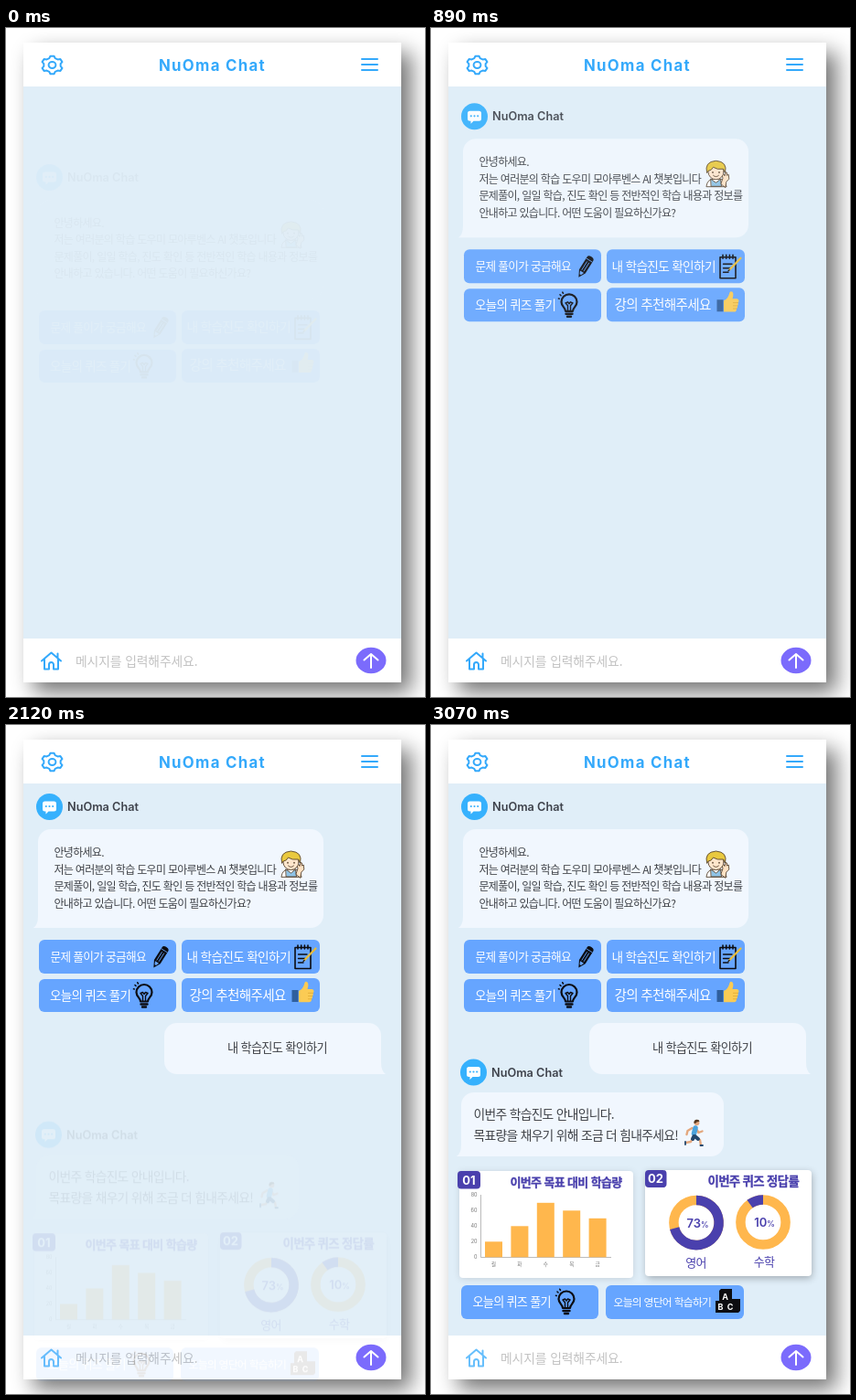
An HTML page for the animation above (3.73 s loop, 458 by 732 pixels).

```html
<!DOCTYPE html>
<html lang="ko">
<head>
<meta charset="utf-8">
<title>Chat</title>
<style>
html, body { margin: 0; width: 100%; height: 100%; overflow: hidden; background: #fff; }
svg { display: block; width: 100vw; height: 100vh; }
text { font-family: "Noto Sans CJK KR", "Noto Sans CJK JP", "Noto Sans CJK", sans-serif; letter-spacing: -.7px; }
.latin { font-family: Inter, "Open Sans", sans-serif; letter-spacing: 0; }
.name { font-size: 12.7px; font-weight: 600; fill: #3e424b; }
.line { fill: none; stroke-linecap: round; stroke-linejoin: round; }
.bubble { fill: #f1f7fe; }
.button { fill: #66a5ff; }
.label { fill: #fff; font-weight: 300; }
.talk { fill: #3f4247; }
.mid { text-anchor: middle; }
.tiny { font-size: 5.5px; fill: #777; letter-spacing: 0; }
.head { font-size: 13px; font-weight: 900; fill: #4a40ad; stroke: #4a40ad; stroke-width: .3; letter-spacing: -.65px; }
.ring { fill: none; stroke-width: 10.5; }
</style>
</head>
<body>
<svg viewBox="0 0 458 732" preserveAspectRatio="none">
  <defs>
    <filter id="blur" x="-20%" y="-20%" width="140%" height="140%"><feGaussianBlur stdDeviation="11.500"/></filter>
    <filter id="soft" x="-20%" y="-20%" width="140%" height="140%"><feGaussianBlur stdDeviation="4"/></filter>
    <g id="avatar">
      <circle r="14.500" fill="#36b1fd"/>
      <path d="M-5-6H5q2.500 0 2.500 2.500V2.500Q7.500 5 5 5H-1L-4 8V5H-5Q-7.500 5-7.500 2.500V-3.500Q-7.500-6-5-6Z" fill="#fff"/>
      <g fill="#36b1fd"><circle cx="-3.700" cy="-.5" r="1.100"/><circle cy="-.5" r="1.100"/><circle cx="3.700" cy="-.5" r="1.100"/></g>
    </g>
    <g id="bulb" class="line" stroke="#0c0c10" stroke-width="2.200">
      <path d="M-4 8C-4 4-8.500 3-8.500-2A8.500 8.500 0 0 1 8.500-2C8.500 3 4 4 4 8Z"/>
      <path d="M-1.500 7V2L-4-1L-1.500-2L0 0L1.500-2L4-1L1.500 2V7" stroke-width="1.400"/>
      <path d="M-3.500 11H3.500M-2 14H2" stroke-width="2.400"/>
      <path d="M-9-9l-1-1M-6.500-11.500l-.7-1.200M-10.800-5.500l-.7-.2" stroke-width="1.600"/>
    </g>
  </defs>

  <rect x="30" y="27" width="413" height="700" opacity=".55" filter="url(#blur)"/>
  <rect x="19" y="16" width="413" height="700" fill="#fff"/>
  <rect x="19" y="64" width="413" height="604" fill="#e0eef8"/>
  <g class="line" stroke="#34a9fb" stroke-width="2">
    <path id="gear"/>
    <ellipse cx="50.500" cy="40.500" rx="3.900" ry="3.400"/>
    <path d="M389 34H406M389 40H406M389 46H406"/>
    <path id="home" d="M39 692.500L49.500 683.500L60 692.500M42 690.500V701.500H47V696.500a2.500 2.500 0 0 1 5 0V701.500H57V690.500M56.500 684.500V688.500"/>
  </g>
  <text class="latin mid" x="225.500" y="46.500" font-size="16.800" font-weight="700" fill="#34a9fb" style="letter-spacing:1.300px">NuOma Chat</text>
  <text x="76" y="697.500" font-size="13.800" font-weight="300" fill="#c2c2c2" style="letter-spacing:-.1px">메시지를 입력해주세요.</text>
  <ellipse cx="399" cy="692" rx="16.500" ry="14.300" fill="#7b6bfc"/>
  <path class="line" stroke="#fff" stroke-width="2" d="M399 700V685M391.500 691.500L399 685L406.500 691.500"/>

  <g class="part">
    <use href="#avatar" x="47.500" y="89.500"/>
    <text class="latin name" x="67" y="94">NuOma Chat</text>
    <path class="bubble" d="M49 114H333a14 14 0 0 1 14 14V208a14 14 0 0 1-14 14H30q5-3 5-13V128a14 14 0 0 1 14-14Z"/>
    <g class="talk" font-size="12">
      <text x="52.500" y="144">안녕하세요.</text>
      <text x="52.500" y="162.500">저는 여러분의 학습 도우미 모아루벤스 AI 챗봇입니다</text>
      <text x="52.500" y="181">문제풀이, 일일 학습, 진도 확인 등 전반적인 학습 내용과 정보를</text>
      <text x="52.500" y="199.500">안내하고 있습니다. 어떤 도움이 필요하신가요?</text>
    </g>
    <!-- waving boy -->
    <g class="line" stroke="#5a4630" stroke-width=".9">
      <path d="M301 166q1-8 8-8h7q5 0 7 8z" fill="#fff"/>
      <path d="M306 158l5.500 4 5-4 1 8h-11z" fill="#8fc3e6"/>
      <path d="M317 163l2-6-1-4 2-.5 1 2 1-4 1.500.5v3l1.800-1 .5 5-3 3-1 6z" fill="#ffe2c4"/>
      <circle cx="311.500" cy="150" r="8.500" fill="#ffe6cc"/>
      <path d="M301.500 151q-3-12 10-13 13 1 10 13l-2-4q-7 1-11-2-2 4-5 4z" fill="#e9c93f"/>
      <path d="M308.500 154q3 3 6 0"/>
      <path d="M308 150.500v.5M315 150.500v.5" stroke-width="1.600"/>
    </g>
    <g class="button">
      <rect x="36" y="235" width="150" height="37" rx="6"/>
      <rect x="192" y="235" width="151" height="37" rx="6"/>
      <rect x="36" y="278" width="150" height="36" rx="6"/>
      <rect x="192" y="277" width="151" height="37" rx="6"/>
    </g>
    <g class="label">
      <text x="48.500" y="258" font-size="12.700">문제 풀이가 궁금해요</text>
      <text x="197.500" y="258.500" font-size="13.700">내 학습진도 확인하기</text>
      <text x="48" y="301" font-size="13.500">오늘의 퀴즈 풀기</text>
      <text x="200.500" y="300.500" font-size="14.600">강의 추천해주세요</text>
    </g>
    <!-- pencil -->
    <g transform="translate(168.500 254) rotate(32)">
      <path d="M-4-10q0-3 4-3t4 3V6L0 13.500L-4 6Z" fill="#0c0c10"/>
      <path d="M-4-8.500H4M-1.300-6V5M1.300-6V5" stroke="#66a5ff" stroke-width=".8"/>
      <path d="M-2.400 6.500H2.400L.8 10H-.8Z" fill="#66a5ff"/>
    </g>
    <!-- notepad -->
    <g class="line" stroke="#0c0c10" stroke-width="1.600">
      <path d="M316 243.500H333V266.500H316ZM319 241v4M322.700 241v4M326.400 241v4M330 241v4"/>
      <path d="M319.500 251H329M319.500 255.500H327M319.500 260H325" stroke-width="1.400"/>
      <path d="M326 257.500L338.500 244.500" stroke="#e9bd3a" stroke-width="2.200"/>
      <path d="M325 258.500l1.200-1.200" stroke-width="1.200"/>
    </g>
    <use href="#bulb" x="151" y="294.500"/>
    <!-- thumb up -->
    <rect x="312.500" y="290" width="7" height="13" fill="#2f5f9e"/>
    <path d="M320 291q5-2 6.500-9 1-2 3-.5 1.800 2 0 7.500h5q2 .3 2 2.200 0 1.400-1 2 1 2-.5 3.400.5 2-1 3 .3 3.600-3 3.600H320Z" fill="#fbcb54"/>
    <path d="M330 293.300H336M330 296.600H335.300M330 299.800H334.500" stroke="#dda62f" stroke-width=".7"/>
  </g>

  <g class="part">
    <path class="bubble" d="M187 326H396a14 14 0 0 1 14 14V369q0 10 5 13H187a14 14 0 0 1-14-14V340a14 14 0 0 1 14-14Z"/>
    <text class="talk mid" x="296.500" y="358" font-size="13.200">내 학습진도 확인하기</text>
  </g>

  <g class="part">
    <use href="#avatar" x="46.500" y="380"/>
    <text class="latin name" x="66" y="385">NuOma Chat</text>
    <path class="bubble" d="M47 402H306a14 14 0 0 1 14 14V458a14 14 0 0 1-14 14H28q5-3 5-13V416a14 14 0 0 1 14-14Z"/>
    <g class="talk" font-size="13.800">
      <text x="46.500" y="431">이번주 학습진도 안내입니다.</text>
      <text x="46.500" y="453.500">목표량을 채우기 위해 조금 더 힘내주세요!</text>
    </g>
    <!-- runner -->
    <g class="line" stroke-width="2.400">
      <path stroke="#e3a77d" d="M285.500 441l-5 3-1 4M290 442l2.500 4 4-1.500M286 452l-2 4-5.500 1M290 452l4 2 1 6"/>
      <path stroke="#4ba3dc" stroke-width="5.500" d="M289 441L287.500 447"/>
      <path stroke="#23486e" stroke-width="4" d="M287.500 450L286 453M288.500 450L292 453"/>
      <path stroke="#23486e" stroke-width="1.800" d="M278 456v3M294.500 460h2.500"/>
    </g>
    <circle cx="290.500" cy="435.300" r="2.900" fill="#e3a77d"/>
    <path d="M287.300 435.500q0-4 3.600-3.800 2.500 0 2.600 2.300-3-.6-4.500 2z" fill="#54371f"/>

    <rect x="32" y="490" width="188" height="115" opacity=".15" filter="url(#soft)"/>
    <rect x="31" y="488" width="190" height="117" rx="4" fill="#fff"/>
    <rect x="236" y="490" width="180" height="115" opacity=".3" filter="url(#soft)"/>
    <rect x="234" y="487" width="182" height="116" rx="4" fill="#fff"/>
    <g fill="#4a40ad"><rect x="29" y="488" width="25" height="19.500" rx="4"/><rect x="234" y="487" width="23.500" height="19" rx="4"/></g>
    <g class="mid" font-size="13" font-weight="700" fill="#fff">
      <text class="latin" x="41.500" y="502.500">01</text>
      <text class="latin" x="245.500" y="501">02</text>
    </g>
    <text class="head" x="86.500" y="505">이번주 목표 대비 학습량</text>
    <text class="head" x="302.500" y="503.500" style="font-size:13.400px">이번주 퀴즈 정답률</text>
    <path d="M54.500 514V582.500H197" fill="none" stroke="#aaa" stroke-width=".8"/>
    <g id="chart"></g>

    <g class="ring">
      <circle cx="290" cy="544.500" r="24.600" stroke="#ffb74d"/>
      <circle cx="363" cy="544" r="24.600" stroke="#ffb74d"/>
      <path d="M290 519.900A24.600 24.600 0 1 1 266.200 550.600M348.500 524.100A24.600 24.600 0 0 1 363 519.400" stroke="#4a40ad"/>
    </g>
    <g class="mid" font-size="13" fill="#4a40ad">
      <g font-weight="600">
        <text class="latin" x="291.500" y="550">73<tspan font-size="8.500">%</tspan></text>
        <text class="latin" x="364.500" y="549">10<tspan font-size="8.500">%</tspan></text>
      </g>
      <text x="289.500" y="592.500" font-weight="500">영어</text>
      <text x="364" y="592" font-weight="500">수학</text>
    </g>

    <g class="button"><rect x="33" y="613" width="150" height="37" rx="6"/><rect x="191" y="613" width="151" height="37" rx="6"/></g>
    <g class="label">
      <text x="45.500" y="636" font-size="13.100">오늘의 퀴즈 풀기</text>
      <text x="199.500" y="636" font-size="11.800">오늘의 영단어 학습하기</text>
    </g>
    <use href="#bulb" x="148" y="630"/>
    <!-- letter blocks -->
    <path d="M315 619l2-2h12v11h9v13l-2 2H311V630h4Z" fill="#0c0c10"/>
    <g class="mid" font-size="9" font-weight="700" fill="#fff">
      <text class="latin" x="321.500" y="628.500">A</text>
      <text class="latin" x="316.500" y="640">B</text>
      <text class="latin" x="327" y="640">C</text>
    </g>
  </g>
</svg>
<script>
const byId = id => document.getElementById(id);

// six-toothed gear outline, slightly wider than tall
let outline = "";
for (let i = 0; i < 24; i++) {
  const r = i % 4 < 2 ? 10.8 : 8.6;
  const a = (Math.floor(i / 2) * 30 - 90 + (i % 2 ? 10 : -10)) * Math.PI / 180;
  outline += (i ? "L" : "M") + (50.5 + 1.08 * r * Math.cos(a)).toFixed(2) + " " + (40.5 + .92 * r * Math.sin(a)).toFixed(2);
}
byId("gear").setAttribute("d", outline + "Z");

// bar chart
const baseY = 582.3, unit = .85;
let marks = "";
for (let v = 0; v <= 80; v += 20)
  marks += `<text class="tiny latin" text-anchor="end" x="50.5" y="${baseY + 1.5 - v * unit}">${v}</text>`;
[20, 40, 70, 60, 50].forEach((v, i) => {
  const x = 59 + i * 28.4;
  marks += `<rect x="${x}" y="${baseY - v * unit}" width="19" height="${v * unit}" fill="#ffb74d"/>
    <text class="tiny mid" x="${x + 9.5}" y="592">${"월화수목금"[i]}</text>`;
});
byId("chart").innerHTML = marks;

const loop = 3730, step = 68.3, rise = 75, fade = 1000;
const starts = [-15, 1000, 2027];
const parts = document.querySelectorAll(".part");
const origin = performance.now();

function draw(now) {
  const time = Math.max(0, now - origin) % loop;
  const t = Math.floor((time + 5) / step) * step;
  parts.forEach((part, i) => {
    const p = Math.min(1, Math.max(0, (t - starts[i]) / fade));
    part.setAttribute("transform", `translate(0 ${rise * (1 - p)})`);
    part.setAttribute("opacity", i ? p : Math.max(.04, p));
  });
  byId("home").setAttribute("opacity", t > 2020 ? .75 : 1);
  requestAnimationFrame(draw);
}
draw(origin);
</script>
</body>
</html>
```
